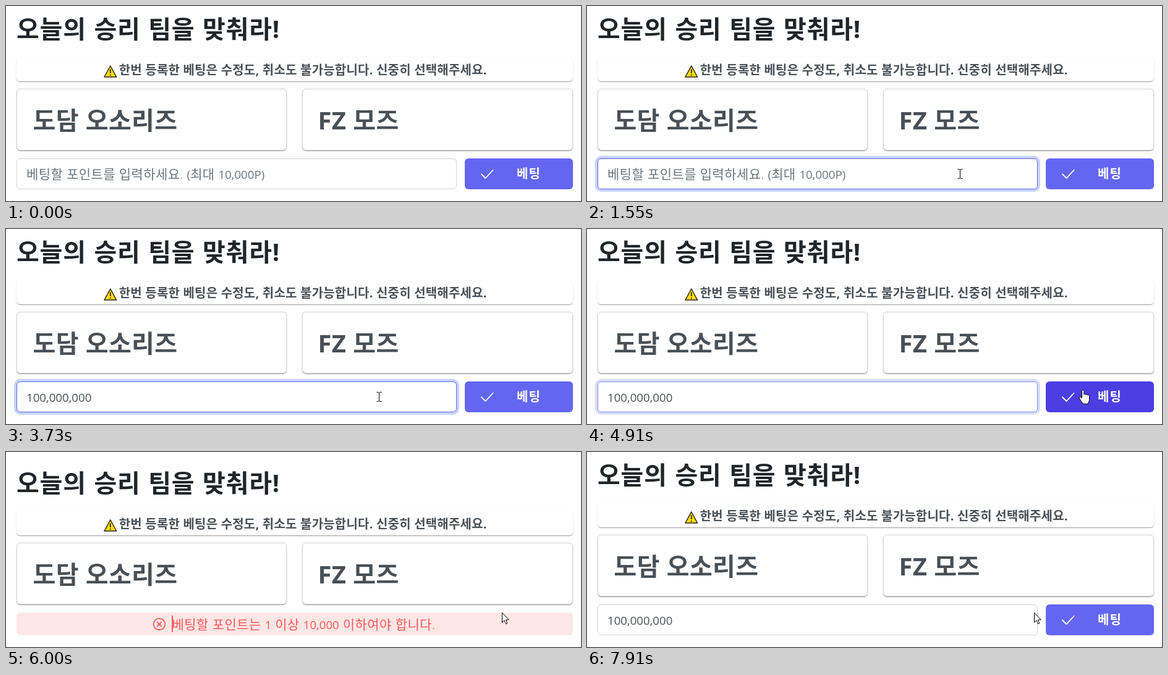
An HTML page for the animation above (8 s loop, 930 by 316 pixels).

```html
<!DOCTYPE html>
<html lang="ko">
<head>
<meta charset="utf-8">
<title>베팅</title>
<style>
  html, body { margin: 0; width: 100%; height: 100%; overflow: hidden; background: #fff; }
  #stage { position: relative; width: 930px; height: 316px; overflow: hidden; }
  #stage div { position: absolute; box-sizing: border-box; }
  svg { position: absolute; left: 0; top: 0; font-family: "Open Sans", "Noto Sans CJK KR", "Noto Sans CJK", sans-serif; }
  .layer { left: 0; top: 0; width: 930px; height: 316px; }
  .panel {
    border-radius: 6px; background: #fff;
    box-shadow: 0 2px 1px -1px rgba(0,0,0,.2), 0 1px 1px rgba(0,0,0,.14), 0 1px 3px rgba(0,0,0,.12);
  }
  .notice { left: 17px; top: 83px; width: 900px; height: 39px; }
  .card { top: 134px; height: 100px; border: 1px solid #ced4da; }
  .field { left: 17px; top: 247px; width: 712px; height: 50px; border: 1px solid #ced4da; border-radius: 6px; background: #fff; }
  .ring { border-color: #6366f1; box-shadow: 0 0 0 4px #c7d2fe; }
  #button { left: 742px; top: 247px; width: 175px; height: 50px; border-radius: 6px; }
  .message { left: 17px; top: 260px; width: 900px; height: 37px; border-radius: 6px; background: #ffe7e6; }
  .bold { font-weight: 700; }
  .hangul { font-size: 21px; font-weight: 350; }
  .latin { font-size: 18.7px; font-weight: 400; letter-spacing: 0; }
</style>
</head>
<body>
<div id="stage">
  <div id="top" class="layer">
    <div class="panel notice"></div>
    <div class="panel card" style="left:17px;width:437px"></div>
    <div class="panel card" style="left:479px;width:438px"></div>
    <svg width="930" height="316" class="bold" fill="#495057">
      <text x="17" y="52" font-size="40" letter-spacing=".8" word-spacing="1.4" fill="#212529">오늘의 승리 팀을 맞춰라!</text>
      <path d="M168.8 97 178.6 115H159Z" fill="#ffdc00" stroke="#25221c" stroke-width="1.5" stroke-linejoin="round"/>
      <path d="M168.8 102.5V109M168.8 111V113" stroke="#25221c" stroke-width="1.7"/>
      <text x="182.7" y="111" font-size="20" letter-spacing=".2">한번 등록한 베팅은 수정도, 취소도 불가능합니다. 신중히 선택해주세요.</text>
      <text x="43.5" y="200" font-size="40" letter-spacing=".4">도담 오소리즈</text>
      <text x="504.5" y="200" font-size="40" letter-spacing=".4">FZ 모즈</text>
    </svg>
  </div>

  <div id="form" class="layer">
    <div class="field"></div>
    <div id="ring" class="field ring"></div>
    <div id="button"></div>
    <svg width="930" height="316">
      <text id="hint" class="hangul" x="33" y="280" letter-spacing=".4" fill="#6c757d">베팅할 포인트를 입력하세요. <tspan class="latin">(</tspan>최대 <tspan class="latin">10,000P)</tspan></text>
      <text id="value" class="latin" x="33" y="280" fill="#495057"></text>
      <rect id="caret" y="258" width="1" height="27" fill="#495057"/>
      <path d="M769 272.5 775.5 279 787.5 266" fill="none" stroke="#fff" stroke-width="1.8" stroke-linecap="round" stroke-linejoin="round"/>
      <text class="bold" x="826" y="279" font-size="20" letter-spacing="1" fill="#fff">베팅</text>
    </svg>
  </div>

  <div id="error" class="layer">
    <div class="message"></div>
    <svg width="930" height="316">
      <g fill="none" stroke="#ff5757" stroke-width="1.7" stroke-linecap="round">
        <circle cx="248" cy="279" r="9.3"/>
        <path d="M244.7 275.7 251.3 282.3M251.3 275.7 244.7 282.3"/>
      </g>
      <rect id="errorCaret" x="268" y="265" width="2" height="27" fill="#ff5757"/>
      <text class="hangul" x="268.5" y="286.5" letter-spacing=".45" fill="#ff5757">베팅할 포인트는 <tspan class="latin">1</tspan> 이상 <tspan class="latin">10,000</tspan> 이하여야 합니다.</text>
    </svg>
  </div>

  <svg width="930" height="316">
    <g id="cursor" fill="#fff" stroke="#000" stroke-linejoin="round">
      <path id="arrow" d="M.5.5V16.3L4.1 12.9 6.6 18.6 8.9 17.6 6.4 12H11.3Z"/>
      <path id="beam" fill="none" d="M-3.5-7.5H-1L.5-6.5 2-7.5H4.5M.5-6.5V6.5M-3.5 7.5H-1L.5 6.5 2 7.5H4.5"/>
      <path id="hand" transform="translate(-6.5 .5)" d="M5 13V2.2a1.7 1.7 0 0 1 3.4 0V8a1.6 1.6 0 0 1 3 .3 1.6 1.6 0 0 1 3 .6 1.5 1.5 0 0 1 2.6 1v6c0 3-2 4-2 7H6.5c0-2-2-3-3.3-5.5L.6 13.5c-.6-1.6 1.3-2.6 2.5-1.3Z"/>
    </g>
  </svg>
</div>

<script>
const LOOP = 8000;
const TICKS_PER_SECOND = 11;

// Times below are in ticks.
const KEYS = [23, 24, 26, 27, 29, 31, 32, 33, 35];
const CARET = [15, 17, 23, 41, 46, 52];
const ERROR = [55, 87];
const ERROR_CARET = [55, 61, 66, 72, 77, 84];
const CURSOR_X = [[8, 632], [10, 612], [12, 603], [45, 603], [47, 632], [49, 715], [51, 792], [52, 802], [85, 802], [86, 789], [87, 723]];
const CURSOR_Y = [[8, 306], [10, 284], [12, 272], [45, 272], [49, 264], [52, 260]];
const FOCUS = [[13, 0], [15, 1], [53, 1], [54, .7], [55, 0]];
const HOVER = [[49, 0], [51, 1], [53, 1], [54, 1.25], [55, 0]];
const BUTTON = [99, 102, 241];
const BUTTON_HOVER = [79, 70, 229];

const $ = id => document.getElementById(id);
const show = (id, on) => { $(id).style.visibility = on ? "visible" : "hidden"; };
const countPassed = (times, tick) => times.filter(t => t <= tick).length;
const toggled = (times, tick) => countPassed(times, tick) % 2 === 1;

function track(points, tick) {
  const next = points.findIndex(([t]) => t > tick);
  if (next === 0) return points[0][1];
  if (next < 0) return points[points.length - 1][1];
  const [t0, a] = points[next - 1];
  const [t1, b] = points[next];
  return a + (b - a) * (tick - t0) / (t1 - t0);
}

function drawCursor(tick, failed) {
  const x = track(CURSOR_X, tick);
  const y = track(CURSOR_Y, tick);
  const free = failed || tick >= ERROR[1] || y > 297;
  const shape = !free && x < 729 ? "beam" : !free && x >= 742 ? "hand" : "arrow";
  for (const id of ["arrow", "beam", "hand"]) {
    $(id).style.display = id === shape ? "" : "none";
  }
  $("cursor").setAttribute("transform", `translate(${Math.round(x)} ${Math.round(y)})`);
  show("cursor", tick >= 8);
}

function draw(tick) {
  const failed = toggled(ERROR, tick);
  $("top").style.transform = failed ? "translateY(13px)" : "none";
  $("form").style.display = failed ? "none" : "";
  $("error").style.display = failed ? "" : "none";
  show("errorCaret", toggled(ERROR_CARET, tick));

  const digits = countPassed(KEYS, tick);
  $("value").textContent = digits ? (10 ** (digits - 1)).toLocaleString("en-US") : "";
  show("hint", !digits);
  show("caret", toggled(CARET, tick));
  if (!failed) {
    const width = digits ? $("value").getComputedTextLength() : 0;
    $("caret").setAttribute("x", Math.floor(33 + width));
  }

  $("ring").style.opacity = track(FOCUS, tick);
  const hover = track(HOVER, tick);
  const color = BUTTON.map((c, i) => Math.round(c + (BUTTON_HOVER[i] - c) * hover));
  $("button").style.background = `rgb(${color})`;
  drawCursor(tick, failed);
}

const start = performance.now();
let lastTick = -1;
function frame() {
  const time = (performance.now() - start) % LOOP;
  const tick = Math.min(87, Math.floor(time * TICKS_PER_SECOND / 1000 + .1));
  if (tick !== lastTick) draw(lastTick = tick);
  requestAnimationFrame(frame);
}
frame();
</script>
</body>
</html>
```
